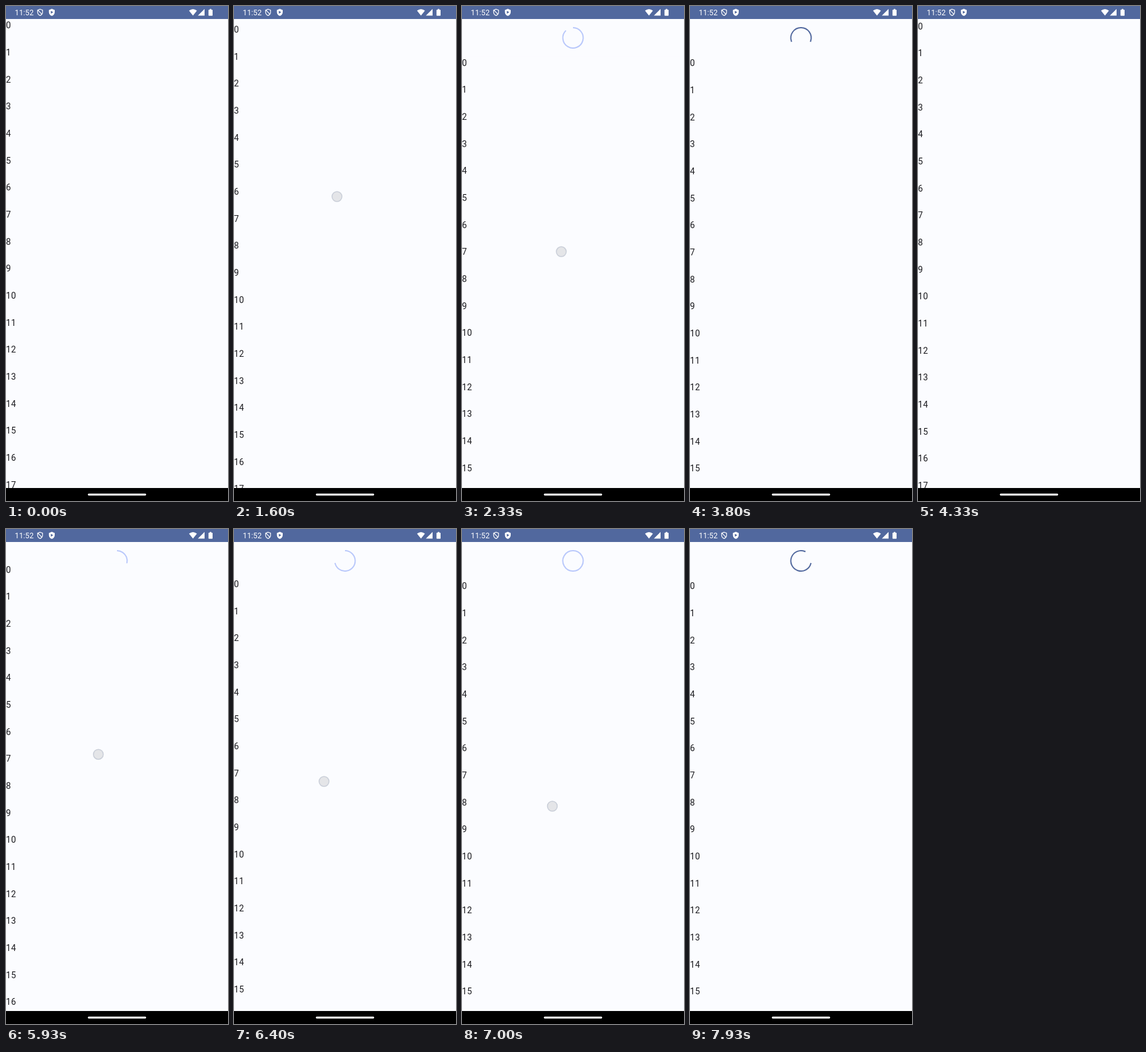
These frames come from a looping animation (360 px wide and 800 px high, 8000 ms). An HTML page:

```html
<!DOCTYPE html>
<html lang="en">
<head>
<meta charset="utf-8">
<title>Pull to refresh</title>
<style>
  html, body { margin: 0; width: 100%; height: 100%; overflow: hidden; background: #fbfcff; }
  svg { display: block; width: 360px; height: 800px; }
  text { font-family: Roboto, sans-serif; }
  #rows text { font-size: 14px; letter-spacing: 0.4375px; fill: #1b1b1f; }
</style>
</head>
<body>
<svg viewBox="0 0 360 800">
  <rect width="360" height="800" fill="#fbfcff"/>
  <path id="spinner" fill="none" stroke-width="2"/>
  <g id="list">
    <rect y="21" width="360" height="800" fill="#fbfcff"/>
    <g id="rows"></g>
  </g>
  <circle id="touch" r="8" fill="#e4e5e8" stroke="#c9ced8" stroke-width="1.5"/>

  <rect width="360" height="21" fill="#51689e"/>
  <g fill="#fff">
    <text x="14.3" y="14.6" font-size="12.25">11:52</text>
    <path d="M55.3 5.2L59.3 6.7V9.8C59.3 12.4 57.6 14.6 55.3 15.4C53 14.6 51.3 12.4 51.3 9.8V6.7Z M51.6 6.4L58.4 13.6" fill="none" stroke="#fff" stroke-width="1.2"/>
    <path fill-rule="evenodd" d="M74.3 4.6L79 6.4V9.8C79 12.8 77 15.3 74.3 16.1C71.6 15.3 69.6 12.8 69.6 9.8V6.4Z M72.7 7.8V12.4L76.6 10.1Z"/>
    <path d="M296.8 7.6Q303.2 2.6 309.6 7.6L303.2 15.6Z"/>
    <path d="M322 4.8V15.6H311.2Z"/>
    <path d="M330.4 4.8H333V6H334.2Q335 6 335 6.8V15Q335 15.8 334.2 15.8H329.2Q328.4 15.8 328.4 15V6.8Q328.4 6 329.2 6H330.4Z"/>
  </g>

  <rect y="779" width="360" height="21" fill="#000"/>
  <rect x="132.7" y="788" width="94.6" height="3.2" rx="1.6" fill="#fff"/>
</svg>
<script>
const LOOP = 8000, FPS = 15;
const HEADER = 61, ROW = 131 / 3;
const SLOP = 7, PULL_RATE = 0.0078;

// path points: time, x, y
const pulls = [
  { down: 1060, up: 2860, spin: 2965, done: 4200,
    path: [[1267, 167, 277.5], [1600, 167, 308], [2333, 161, 397], [2733, 159, 432]] },
  { down: 4995, up: 7460, spin: 7441, done: Infinity,
    path: [[5267, 153, 309], [5467, 153.5, 320.5], [6400, 146, 408], [7000, 146.5, 448], [7200, 146.5, 462]] }
];

const $ = id => document.getElementById(id);
const spinner = $("spinner"), list = $("list"), touch = $("touch");
const clamp = v => Math.min(1, Math.max(0, v));

for (let i = 0; i < 18; i++) {
  const label = document.createElementNS("http://www.w3.org/2000/svg", "text");
  label.setAttribute("y", 36.3 + i * ROW);
  label.textContent = i;
  $("rows").append(label);
}

// cubic-bezier(.4, 0, .2, 1)
function ease(x) {
  x = clamp(x);
  let lo = 0, hi = 1;
  for (let i = 0; i < 24; i++) {
    const s = (lo + hi) / 2, r = 1 - s;
    if (1.2 * s * r * r + 0.6 * s * s * r + s * s * s < x) lo = s; else hi = s;
  }
  return lo * lo * (3 - 2 * lo);
}

function along(path, t) {
  if (t <= path[0][0]) return path[0].slice(1);
  for (let i = 1; i < path.length; i++) {
    const a = path[i - 1], b = path[i];
    if (t < b[0]) {
      const u = (t - a[0]) / (b[0] - a[0]);
      return [a[1] + (b[1] - a[1]) * u, a[2] + (b[2] - a[2]) * u];
    }
  }
  return path[path.length - 1].slice(1);
}

// angles in degrees, clockwise from the top
function drawArc(start, sweep, color, cap) {
  sweep = Math.min(sweep, 359.9);
  const point = deg => {
    const a = deg * Math.PI / 180;
    return (180 + 16.5 * Math.sin(a)).toFixed(3) + " " + (51.5 - 16.5 * Math.cos(a)).toFixed(3);
  };
  spinner.setAttribute("d", sweep > 0
    ? `M${point(start)}A16.5 16.5 0 ${sweep > 180 ? 1 : 0} 1 ${point(start + sweep)}` : "");
  spinner.setAttribute("stroke", color);
  spinner.setAttribute("stroke-linecap", cap);
}

function drawSpin(ms) {
  const turn = Math.floor(ms / 1332), e = ms % 1332;
  const head = 290 * ease(e / 666), tail = 290 * ease((e - 666) / 666);
  drawArc(tail + 286 * e / 1332 + 216 * turn, Math.max(0.5, head - tail), "#51689e", "square");
}

function render(t) {
  const pull = pulls.find(p => t >= p.down && t < p.done + 400);
  let progress = 0, refreshing = false;
  touch.style.display = "none";
  if (pull) {
    const [x, y] = along(pull.path, t);
    if (t < pull.up) {
      touch.style.display = "";
      touch.setAttribute("cx", x);
      touch.setAttribute("cy", y);
      progress = clamp((y - pull.path[0][2] - SLOP) * PULL_RATE);
    } else if (t < pull.done) {
      progress = 1;
      refreshing = true;
    } else {
      const k = (t - pull.done) * 0.03;
      progress = (1 + k) * Math.exp(-k);
    }
  }
  list.setAttribute("transform", `translate(0 ${(HEADER * ease(progress)).toFixed(2)})`);
  if (refreshing) drawSpin(Math.max(0, t - pull.spin));
  else drawArc(0, 360 * progress, "#b9c8fb", "butt");
}

function tick() {
  const t = performance.now() % LOOP;
  const step = Math.min(LOOP * FPS / 1000 - 1, Math.floor((t + 5) * FPS / 1000));
  render(step * 1000 / FPS);
  requestAnimationFrame(tick);
}
tick();
</script>
</body>
</html>
```
